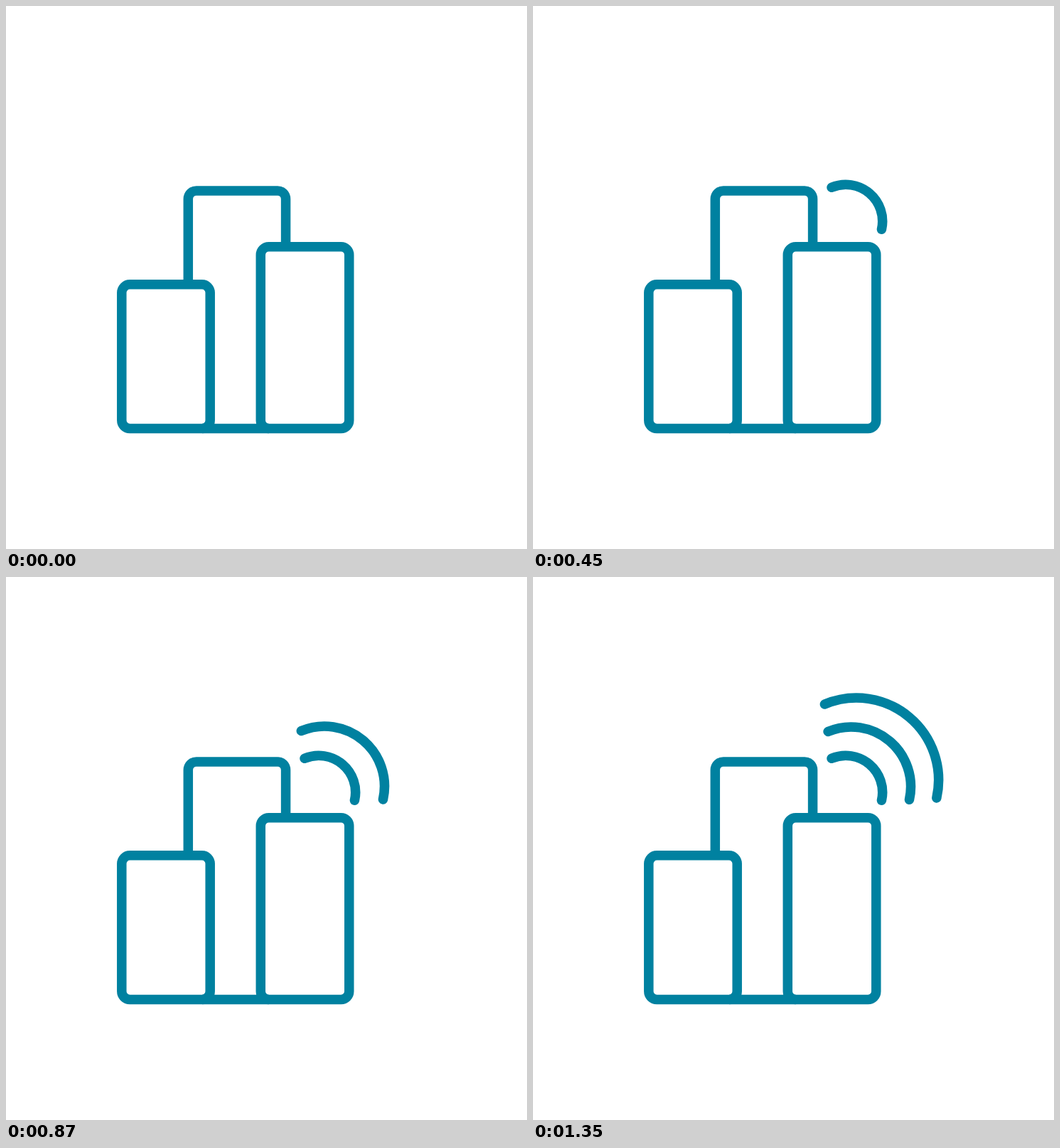
An HTML page that plays this animation: 733 px wide and 764 px high, repeating every 8 s.

```html
<!DOCTYPE html>
<html lang="en">
<head>
<meta charset="utf-8">
<title>Buildings with signal</title>
<style>
  html, body { margin: 0; width: 100%; height: 100%; overflow: hidden; background: #fff; }
  svg { display: block; width: 100%; height: 100%; }
</style>
</head>
<body>
<svg viewBox="0 0 733 764" fill="none" stroke="#0081a0" stroke-width="13.5">
  <path d="M256.3 391.8V271.4a11.5 11.5 0 0 1 11.5-11.5H382.1a11.5 11.5 0 0 1 11.5 11.5V338.7"/>
  <path d="M276 594.5H370"/>
  <rect x="162.8" y="391.8" width="124.4" height="202.7" rx="11.5"/>
  <rect x="358.3" y="338.7" width="124.5" height="255.8" rx="11.5"/>
  <g id="waves" stroke-linecap="round"></g>
</svg>
<script>
const LOOP = 8000, STEP = 30;
const GAP = 447, LENGTH = 450;   // delay between waves, length of one pop
const PEAK = 1.05;
const OX = 366.5, OY = 382;      // scaling origin: middle of the stage
const START = -112.7, END = 12.6;

const waves = [
  { x: 440, y: 303, r: 51.7 },
  { x: 447.5, y: 295, r: 84 },
  { x: 455, y: 285.7, r: 115.6 }
];

function point({ x, y, r }, deg) {
  const a = deg * Math.PI / 180;
  return `${(x + r * Math.cos(a)).toFixed(2)} ${(y + r * Math.sin(a)).toFixed(2)}`;
}

const group = document.getElementById('waves');
for (const w of waves) {
  w.el = document.createElementNS('http://www.w3.org/2000/svg', 'path');
  w.el.setAttribute('d', `M${point(w, START)}A${w.r} ${w.r} 0 0 1 ${point(w, END)}`);
  group.prepend(w.el);
}

// Grow past full size in the first half, settle in the second.
function scaleAt(p) {
  return p < 0.5 ? PEAK * p * 2 : PEAK - (PEAK - 1) * (p - 0.5) * 2;
}

function draw(ms) {
  const t = Math.floor((ms % LOOP) / STEP) * STEP;
  waves.forEach((w, i) => {
    const p = Math.min((t - i * GAP) / LENGTH, 1);
    const shown = p > 0.02;
    w.el.setAttribute('visibility', shown ? 'visible' : 'hidden');
    if (!shown) return;
    w.el.setAttribute('opacity', Math.min(p * 2, 1));
    w.el.setAttribute('transform',
      `translate(${OX} ${OY}) scale(${scaleAt(p)}) translate(${-OX} ${-OY})`);
  });
}

const begin = performance.now();
function tick() {
  draw(performance.now() - begin);
  requestAnimationFrame(tick);
}
tick();
</script>
</body>
</html>
```
